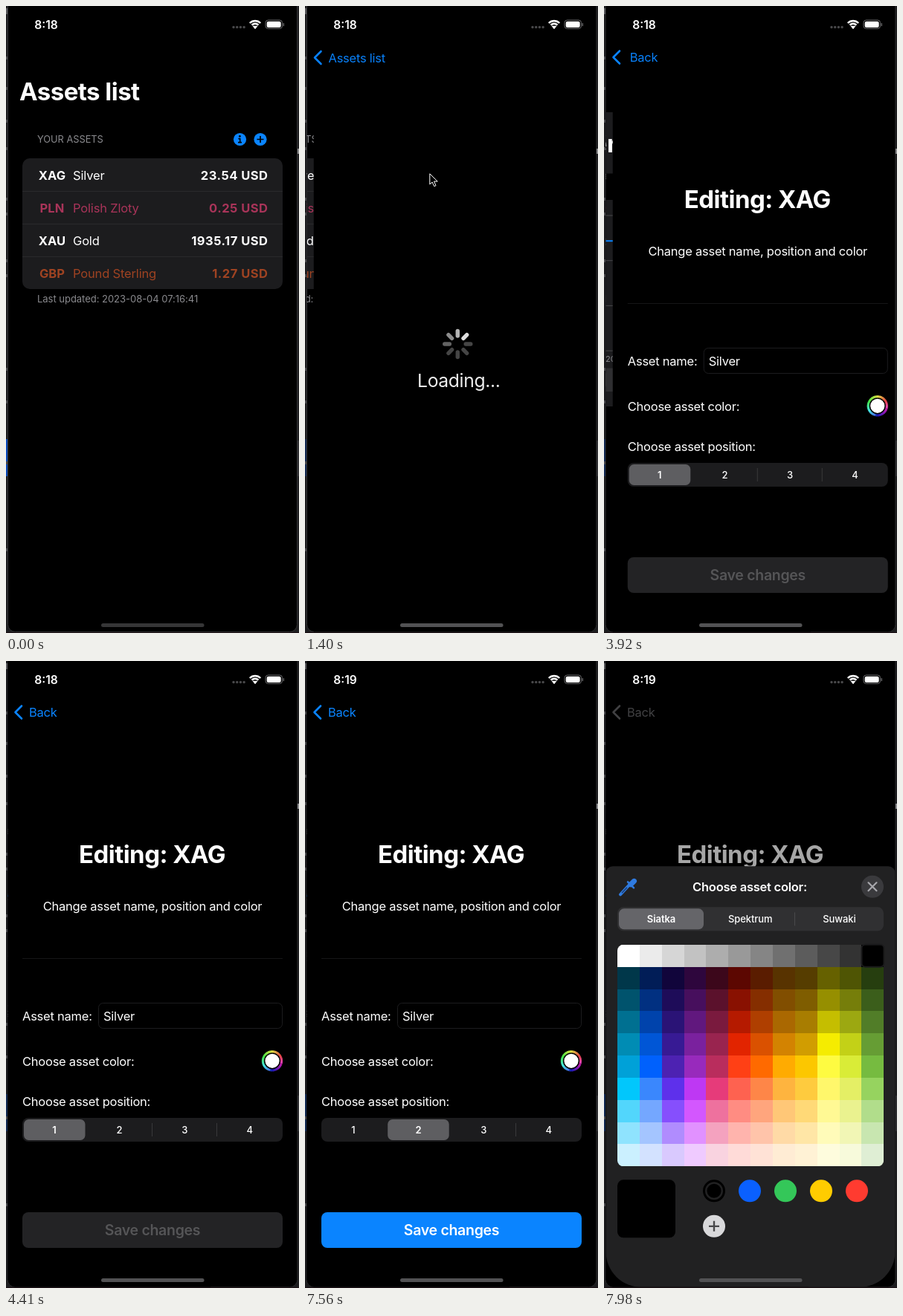
An HTML page that plays this animation: 394 px wide and 844 px high, repeating every 8000 ms.

```html
<!DOCTYPE html>
<html lang="en">
<head>
<meta charset="utf-8">
<title>Assets list</title>
<style>
  html, body { margin: 0; width: 100%; height: 100%; overflow: hidden; background: #1d1d1f; }
  svg { display: block; font-family: Inter, Roboto, sans-serif; font-optical-sizing: none; }
  text { white-space: pre; }
</style>
</head>
<body>
<svg id="stage" width="394" height="844" viewBox="0 0 394 844"></svg>
<script>
const LOOP = 8000, BLUE = '#0a84ff', CARD = '#1c1c1e', GRAY = '#8a8a8e';
const $ = id => document.getElementById(id);
const range = (n, fn) => Array.from({ length: n }, (_, i) => fn(i)).join('');

// Drawing helpers; text is placed by the middle of its capitals.
const text = (x, mid, size, str, o = {}) =>
  `<text x="${x}" y="${mid + size * .364}" font-size="${size}" fill="${o.fill || '#fff'}"
    font-weight="${o.weight || 400}" text-anchor="${o.anchor || 'start'}"
    letter-spacing="${size * (o.track ?? -.0147)}" ${o.id ? `id="${o.id}"` : ''}>${str}</text>`;
const rect = (x, y, w, h, fill, rx = 0, more = '') =>
  `<rect x="${x}" y="${y}" width="${w}" height="${h}" rx="${rx}" fill="${fill}" ${more}/>`;
const circle = (x, y, r, fill, more = '') => `<circle cx="${x}" cy="${y}" r="${r}" fill="${fill}" ${more}/>`;
const stroke = (d, color, width = 1, more = '') =>
  `<path d="${d}" fill="none" stroke="${color}" stroke-width="${width}" ${more}/>`;
const body = (x, mid, str, o) => text(x, mid, 16.5, str, o);
const label = (x, mid, str, o) => text(x, mid, 13, str, { anchor: 'middle', weight: 500, track: -.005, ...o });
const title = (x, mid, str, o) => text(x, mid, 33, str, { weight: 700, track: -.016, ...o });

const parse = s => [1, 3, 5].map(i => parseInt(s.slice(i, i + 2), 16));
const mix = (a, b, k) => {
  const p = parse(a), q = parse(b);
  return `rgb(${p.map((v, i) => Math.round(v + (q[i] - v) * k))})`;
};

function listPage() {
  const rows = [
    ['XAG', 'Silver', '23.54', '#fff'],
    ['PLN', 'Polish Zloty', '0.25', '#a93459'],
    ['XAU', 'Gold', '1935.17', '#fff'],
    ['GBP', 'Pound Sterling', '1.27', '#9f4322'],
  ];
  return text(42, 179.5, 12.8, 'YOUR ASSETS', { fill: GRAY, track: 0 })
    + circle(314.5, 179.5, 8.6, BLUE) + circle(342, 179.5, 8.6, BLUE)
    + circle(314.4, 175.3, 1.4, '#000')
    + stroke('M312.4 178.6h2.3v5M312 183.6h5', '#000', 1.6)
    + stroke('M337.5 179.5h9M342 175v9', '#000', 1.7)
    + rect(22, 205, 350, 176, CARD, 10)
    + rows.map(([code, name, price, fill], i) => {
      const y = 227.5 + 44 * i;
      return (i ? rect(22, y - 22.5, 350, 1, '#2a2a2c') : '')
        + body(62, y, code, { fill, weight: 700, anchor: 'middle', track: .004 })
        + body(90, y, name, { fill, track: -.01 })
        + body(352.5, y, price + ' USD', { fill, weight: 700, anchor: 'end', track: .03 });
    }).join('')
    + text(42, 394.5, 13, 'Last updated: 2023-08-04 07:16:41', { fill: GRAY, track: -.002 });
}

function loading() {
  return `<g id="loading">`
    + range(8, i => `<rect class="spoke" x="-2.7" y="-20.2" width="5.4" height="12" rx="2.7" fill="#fff"
        transform="translate(195.5 455) rotate(${45 * i})"/>`)
    + text(197, 504, 24.7, 'Loading...', { anchor: 'middle', fill: '#eee' }) + '</g>';
}

function chart() {
  const levels = [312.5, 316, 316.3, 317, 317.6, 319.8, 314.4, 316.4];
  const at = i => 60.3 + 36.5 * i;
  return '<g id="chart">'
    + rect(22, 143, 350, 82.5, CARD, 10) + title(42, 185, 'Silver')
    + stroke('M336.5 188.5L346 178.8', '#2f74e0', 1.8) + stroke('M334 190.5h16', '#2f5fc8', 1.3)
    + circle(346.5, 178.3, 1, '#6f9f8f')
    + rect(22, 261, 350, 278, CARD, 10)
    + range(4, i => rect(42, 281.5 + 60.7 * i, 292, 1, '#48484a')
      + text(338, 282 + 60.7 * i, 11, 30 - 10 * i, { fill: GRAY, track: 0 }))
    + range(9, i => stroke(`M${42 + 36.5 * i} 282V480`, '#434345', 1, 'stroke-dasharray="2 2"'))
    + range(8, i => text(43 + 36.5 * i, 475, 11, '202…', { fill: GRAY, track: 0 }))
    + stroke('M' + levels.map((y, i) => at(i) + ' ' + y).join('L'), BLUE, 2)
    + levels.map((y, i) => circle(at(i), y, 4, BLUE)).join('')
    + rect(42, 487.5, 310, 31.5, '#2f2f31', 8) + rect(44, 489, 72.5, 28.5, '#656569', 7)
    + rect(196, 494, 1, 18, '#49494b') + rect(273, 494, 1, 18, '#49494b')
    + ['week', 'month', 'quarter', 'year'].map((s, i) =>
      label(80 + 77.6 * i, 503.5, s, { weight: i ? 500 : 600 })).join('')
    + '</g>';
}

function editPage() {
  const ring = range(36, i => stroke('M-1.4 0h2.8', `hsl(${60 - 10 * i} 75% ${i > 10 && i < 20 ? 40 : 58}%)`, 3,
    `transform="translate(358 538.3) rotate(${10 * i}) translate(0 -12.6)"`));
  return title(196.5, 260, 'Editing: XAG', { anchor: 'middle' })
    + body(197, 330, 'Change asset name, position and color', { anchor: 'middle' })
    + rect(22, 400, 350, 1, '#161617')
    + body(22, 478, 'Asset name:') + rect(124.5, 460.5, 247, 34, 'none', 6, 'stroke="#1c1c1e"')
    + body(131, 478, 'Silver')
    + body(22, 538.5, 'Choose asset color:')
    + `<g id="well">${ring}${circle(358, 538.3, 9.6, '#fff')}</g>`
    + body(22, 592.5, 'Choose asset position:')
    + rect(22, 615, 350, 32, CARD, 8)
    + rect(196, 622, 1, 18, '#39393b', 0, 'id="divider"') + rect(283, 622, 1, 18, '#39393b')
    + rect(24, 617, 82.5, 28, '#5e5e61', 6.5, 'id="thumb"')
    + range(4, i => label(65 + 87.6 * i, 631, i + 1, { id: 'pos' + i }))
    + rect(22, 742, 350, 48, '#232325', 8, 'id="save"')
    + text(197, 766, 19.5, 'Save changes', { weight: 600, anchor: 'middle', id: 'saveText' });
}

function colorGrid() {
  // Key rows of the palette; the rows between them are blends.
  const keys = {
    1: '00374a 011d57 11053b 2e063d 3c071b 5c0701 5a1c00 583300 563d00 666100 4f5504 263e0f',
    4: '008cb4 0056d6 371a94 7a219e 99244f e22400 da5100 d38301 d19d01 f5ec00 c3d117 669d34',
    5: '00a1d8 0061fd 4d22b2 982abc b92d5d ff4015 ff6a00 ffab01 fcc700 fefb41 d9ec37 76bb40',
    6: '01c7fc 3a87fd 5e30eb be38f3 e63b7a fe6250 fe8648 feb43f fecb3e fff76b e4ef65 96d35f',
    7: '52d6fc 74a7ff 864ffd d357fe ee719e ff8c82 ffa57d ffc777 ffd977 fff994 eaf28f b1dd8b',
    9: 'cbf0ff d3e2ff d9c9fe efcaff f9d3e0 ffdbd8 ffe2d6 ffecd4 fff2d5 fefcdd f7fadb dfeed4',
  };
  const stops = Object.keys(keys).map(Number);
  const color = (row, c) => '#' + keys[row].split(' ')[c];
  const fill = (row, c) => {
    if (!row) { const v = c < 11 ? Math.round(255 - 20.4 * c) : 0; return `rgb(${v},${v},${v})`; }
    const above = stops.filter(s => s <= row).pop(), below = stops.find(s => s >= row);
    return mix(color(above, c), color(below, c), (row - above) / (below - above || 1));
  };
  const size = 29.85;
  return '<g clip-path="url(#gridClip)" shape-rendering="crispEdges">'
    + range(120, i => rect(18 + i % 12 * size, 105.5 + Math.floor(i / 12) * size, size, size,
      fill(Math.floor(i / 12), i % 12))) + '</g>'
    + rect(346.5, 105.5, 30, 30, '#000', 5, 'stroke="#1a1a1b" stroke-width="2"');
}

function sheet() {
  const swatches = ['#0a60ff', '#34c759', '#ffcc00', '#ff3b30'];
  return rect(2, 0, 390, 700, '#212122', 10)
    + stroke('M22 38L34 25', '#2f7be0', 4, 'stroke-linecap="round"')
    + stroke('M24 36L31 28.5', '#1b3f78', 1.5)
    + stroke('M32 21L40 29', '#2f7be0', 2.5, 'stroke-linecap="round"')
    + stroke('M36 24.5L40.5 20', '#2f7be0', 7, 'stroke-linecap="round"')
    + body(196, 27.5, 'Choose asset color:', { weight: 600, anchor: 'middle' })
    + circle(361, 27.5, 15, '#3a3a3d') + stroke('M355.5 22l11 11M366.5 22l-11 11', '#a6a6ab', 2.2, 'stroke-linecap="round"')
    + rect(18, 55, 358, 32, '#303032', 8) + rect(20, 57, 114, 28, '#656569', 7) + rect(256, 62, 1, 18, '#49494b')
    + ['Siatka', 'Spektrum', 'Suwaki'].map((s, i) => label(77 + 119.7 * i, 71, s, { weight: i ? 500 : 600 })).join('')
    + colorGrid()
    + rect(18, 422, 78, 78, '#000', 8)
    + circle(148, 437, 13.5, '#212122', 'stroke="#000" stroke-width="3"') + circle(148, 437, 9.5, '#000')
    + swatches.map((c, i) => circle(196 + 48 * i, 437, 15, c)).join('')
    + circle(148, 484.5, 15, '#d9d9db') + stroke('M141 484.5h14M148 477.5v14', '#48484a', 2.4);
}

function statusBar() {
  const arc = r => stroke(`M${335 - r * .72} ${30 - r * .7}A${r} ${r} 0 0 1 ${335 + r * .72} ${30 - r * .7}`, '#fff', 2.4);
  return text(54, 25, 15.6, '8:18', { weight: 600, anchor: 'middle', track: 0, id: 'clock' })
    + range(4, i => circle(306 + 4.7 * i, 28.5, 1.7, '#48484a'))
    + arc(10) + arc(6.2) + stroke('M333 27.5L335 30l2-2.5z', '#fff', 1.6)
    + rect(349, 19, 22.5, 11.5, 'none', 3.6, 'stroke="#6a6a6c"') + rect(350.7, 20.7, 19, 8.2, '#fff', 2.2)
    + rect(372.7, 23, 1.3, 4, '#6a6a6c', .6);
}

$('stage').innerHTML = `<defs>
    <clipPath id="screen">${rect(2.5, -60, 389, 902.5, '#000', 10)}</clipPath>
    <clipPath id="rounded">${rect(2.5, -90, 389, 933, '#000', 48)}</clipPath>
    <clipPath id="gridClip">${rect(18, 105.5, 358.2, 298.5, '#000', 8)}</clipPath>
  </defs>`
  + rect(0, 0, 394, 844, '#1d1d1f') + rect(0, 843, 394, 1, '#1c1014')
  + rect(0, 583, 2, 50, '#0848b8', 0, 'id="selection"')
  + [70, 111, 155, 192, 260, 280, 343, 363, 489, 533, 615, 732].map(y => rect(0, y - 2, 2, 4, '#4a4a4d')).join('')
  + rect(0, 3, 2, 8, '#5a5a5d') + rect(392, 192, 2, 7, '#8a8a8c') + rect(392, 585, 2, 48, '#2e2e31')
  + rect(2.5, -30, 389, 872.5, '#000', 10, 'stroke="#333335"')
  + `<g clip-path="url(#screen)">
      <g id="list">${listPage()}</g>
      <g id="detail">${rect(2, 0, 390, 844, '#000')}${loading()}${chart()}</g>
      <g id="edit">${rect(2, 0, 390, 844, '#000')}${editPage()}</g>
      <g id="bigTitle">${title(0, 0, 'Assets list')}</g>
      ${stroke('M21 60.5L12.5 69L21 77.5', BLUE, 2.6, 'id="chevron" stroke-linecap="round" stroke-linejoin="round"')}
      <g id="backList">${body(0, 0, 'Assets list', { fill: BLUE })}</g>
      <g id="back">${body(0, 0, 'Back', { fill: BLUE, id: 'backText' })}</g>
      ${rect(2, 0, 390, 844, '#000', 0, 'id="dim"')}
      <g clip-path="url(#rounded)"><g id="sheet">${sheet()}</g></g>
      ${statusBar()}${rect(128, 831, 138.5, 5, '#555', 2.5, 'id="home"')}
    </g>
    <path id="cursor" d="M167.8 225.8v14.2l3.3-3 2.6 5.7 2.3-1-2.5-5.6h4.7z" stroke="#fff"/>`;

// Critically damped spring: the share of the way still to go.
const remaining = (t, start, rate = 18.26) => {
  const x = Math.max(0, t - start) / 1000 * rate;
  return (1 + x) * Math.exp(-x);
};
const set = (id, attrs) => Object.entries(attrs).forEach(([k, v]) => $(id).setAttribute(k, v));
const place = (id, x, y, opacity = 1, scale = 1) =>
  set(id, { transform: `translate(${x} ${y}) scale(${scale})`, opacity });
const show = (id, on) => set(id, { visibility: on ? 'visible' : 'hidden' });
const spokes = document.querySelectorAll('.spoke');

function render(t) {
  const toDetail = remaining(t, 1096), toEdit = remaining(t, 3616);
  const rise = 1 - remaining(t, 7556, 17.5);

  place('list', -117 * (1 - toDetail), 0);
  place('detail', 390 * toDetail - 117 * (1 - toEdit), 0);
  place('edit', 390 * toEdit, 0);

  // Navigation bar
  place('bigTitle', 31 - 13 * toDetail, 69 + 46 * toDetail, toDetail < .05 ? 0 : toDetail, .5 + .5 * toDetail);
  place('backList', 31 + 20 * toDetail - 90 * (1 - toEdit), 69 + 20 * toDetail, (1 - toDetail) * Math.max(0, 2 * toEdit - 1));
  place('back', 31 + 150 * toEdit, 69, 1 - toEdit);
  const tint = mix(BLUE, '#636366', Math.min(1, rise * 1.17));
  place('chevron', 20 * toDetail, 20 * toDetail, 1 - toDetail);
  set('chevron', { stroke: tint });
  set('backText', { fill: tint });

  // Detail page
  const loaded = t >= 1680, head = 1 + Math.floor((t - 1400) / 125);
  show('loading', !loaded);
  show('chart', loaded);
  spokes.forEach((s, i) => s.setAttribute('opacity', Math.max(.27, .87 - .16 * (((head - i) % 8 + 8) % 8))));

  // Edit page
  const moved = t >= 5800, pressed = t >= 5670 && !moved;
  set('thumb', { x: 24 + 87.2 * (1 - remaining(t, 5790)) });
  show('divider', !moved);
  set('pos0', { 'font-weight': moved ? 500 : 600 });
  set('pos1', { 'font-weight': moved ? 600 : 500, opacity: pressed ? .35 : 1 });
  set('save', { fill: moved ? BLUE : '#232325' });
  set('saveText', { fill: moved ? '#fff' : '#555557' });
  set('well', { opacity: t >= 6790 && t < 6930 ? .7 : 1 });

  // Color sheet
  place('sheet', 0, 273.5 + 572 * (1 - rise));
  set('dim', { opacity: .35 * rise });

  // System
  $('clock').textContent = t < 5670 ? '8:18' : '8:19';
  set('home', { fill: t < 1120 ? '#363637' : t > 7630 && t < 7800 ? '#000' : '#525254' });
  set('selection', { fill: t < 910 ? '#0848b8' : '#132a52' });
  show('cursor', t >= 910 && t < 2800);
}

const start = performance.now();
(function tick() {
  render((performance.now() - start) % LOOP);
  requestAnimationFrame(tick);
})();
</script>
</body>
</html>
```
